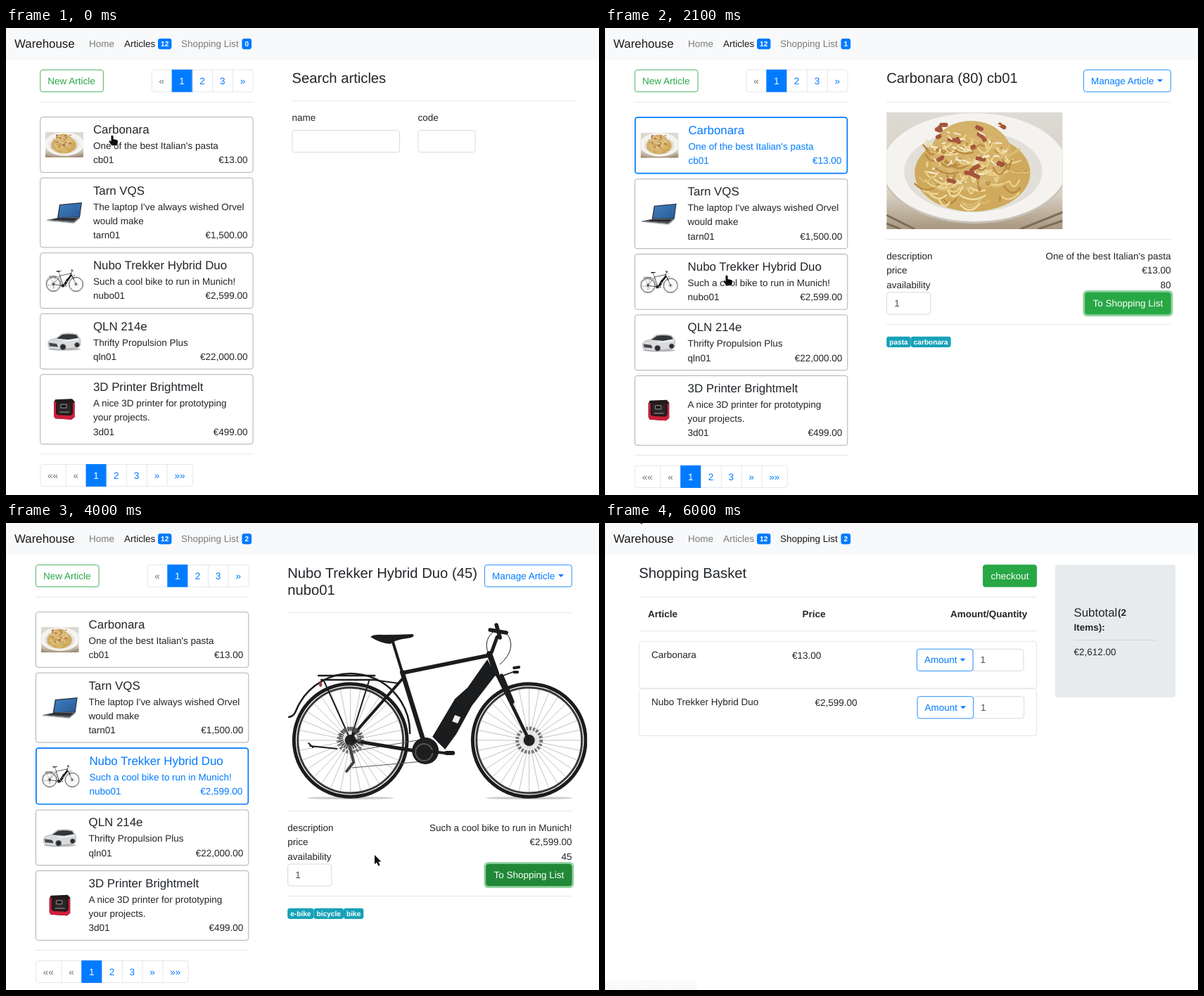
Animation, 843 px wide and 664 px high, one loop 6.1 s. Source, as an HTML page:

```html
<!DOCTYPE html>
<html lang="en">
<head>
<meta charset="utf-8">
<title>Warehouse</title>
<style>
html, body { margin: 0; width: 100%; height: 100%; overflow: hidden; background: #fff; }
svg { display: block; width: 843px; height: 664px; font-family: "Liberation Sans", Arial, sans-serif; text-rendering: geometricPrecision; }
text { white-space: pre; }
</style>
</head>
<body>
<svg viewBox="0 0 843 664">
  <defs>
    <linearGradient id="cloth" x2="0" y2="1"><stop offset="0" stop-color="#dcdad3"/><stop offset=".7" stop-color="#d8d0c3"/><stop offset="1" stop-color="#a8977f"/></linearGradient>
    <linearGradient id="screen" x2="1" y2="1"><stop offset="0" stop-color="#3f7fc0"/><stop offset="1" stop-color="#2a5a96"/></linearGradient>
    <symbol id="pasta" viewBox="0 0 250 166" preserveAspectRatio="none"></symbol>
    <symbol id="bike" viewBox="0 0 426 255"></symbol>
    <symbol id="laptop" viewBox="0 0 54 36">
      <path d="M20 6.5L52 3.5 49 25 17 25.5z" fill="#22262c"/>
      <path d="M21 7.5L51 4.6 48.2 24 18.4 24.6z" fill="url(#screen)"/>
      <path d="M17 25.5L49 25 40.5 32 2 28.5z" fill="#4a4d52"/>
      <path d="M18 26.3L45 26 41 28.8 10 27.7z" fill="#25272b"/>
      <path d="M2 28.5L40.5 32 49 25v1.2L40.5 33.5 2 29.6z" fill="#a2a5a9"/>
    </symbol>
    <symbol id="car" viewBox="0 0 54 36">
      <ellipse cx="27" cy="29" rx="23" ry="2" fill="#bbb"/>
      <path d="M4 19Q6 15 15 14L23 7.5Q35 5 45 8L49.5 15V24L45 27 20 30 7 28.5 4 25z" fill="#d9dbdd" stroke="#8a8c90" stroke-width=".6"/>
      <path d="M16 14L24 8.5Q34 6.5 44 9L47 13 33 15.5z" fill="#33373c"/>
      <path d="M5 20L16 21.5 18 26 6 25z" fill="#45484c"/>
      <path d="M25 18L48 15" stroke="#fff"/>
      <g fill="#292b2e" stroke="#777"><circle cx="25" cy="26" r="4"/><circle cx="45" cy="23" r="3.4"/></g>
    </symbol>
    <symbol id="printer" viewBox="0 0 54 36">
      <path d="M14 4L38 3 41.5 7V29L37 32.5 14 31 12 27V8z" fill="#25191c"/>
      <path d="M12 8l3-1v17l3 2 18 1 3-3V8l2.5 1V29L37 32.5 14 31 12 28z" fill="#cf1f3a"/>
      <path d="M18 9H36V24H18z" fill="#2b2527"/>
      <path d="M22 11H30V16H22zM20 22H34" fill="#161214" stroke="#999"/>
    </symbol>
  </defs>
  <g id="stage"></g>
</svg>
<script>
const $ = id => document.getElementById(id);
const BASE = 13.49, H5 = 16.86, H4 = 20.23, SMALL = 10.12;
const INK = '#212529', BLUE = '#007bff', GREEN = '#28a745', LINE = '#dee2e6';

// y is the middle of the text line
const text = (x, y, s, fill = INK, size = BASE, more = '') =>
  `<text x="${x}" y="${y + size * .347}" font-size="${size}" fill="${fill}" ${more}>${s}</text>`;
const right = (x, y, s, fill) => text(x, y, s, fill, BASE, 'text-anchor="end"');
const mid = (x, y, s, fill) => text(x, y, s, fill, BASE, 'text-anchor="middle"');
const bold = (x, y, s, fill, size) => text(x, y, s, fill, size, 'font-weight="700"');
const box = (x, y, w, h, fill, stroke = 'none', sw = .85, r = 3.4, more = '') =>
  `<rect x="${x + sw / 2}" y="${y + sw / 2}" width="${w - sw}" height="${h - sw}" rx="${r}" fill="${fill}" stroke="${stroke}" stroke-width="${sw}" ${more}/>`;
const rule = (x, y, w, color = '#e5e5e5') => `<path d="M${x} ${y}h${w}" stroke="${color}" stroke-width=".9"/>`;
const button = (x, y, w, s, color) => box(x, y, w, 32, '#fff', color) + text(x + 11, y + 16, s, color);
const solid = (x, y, w, s, color) => box(x, y, w, 32, color, color) + mid(x + w / 2, y + 16, s, '#fff');
const caret = (x, y) => `<path d="M${x} ${y}h8l-4 4z" fill="${BLUE}"/>`;
const input = (x, y, w, s = '') => box(x, y, w, 32, '#fff', '#ced4da') + text(x + 11, y + 16, s, '#495057');
const pill = (x, y, w, s, color) => box(x, y, w, 15.2, color, 'none', 0) + bold(x + 4.05, y + 7.6, s, '#fff', SMALL);
const image = (id, x, y, w, h) => `<use href="#${id}" x="${x}" y="${y}" width="${w}" height="${h}"/>`;

let seed = 7;
const rnd = (a, b) => a + (b - a) * ((seed = seed * 16807 % 2147483647) / 2147483647);
const pick = list => list[Math.floor(rnd(0, list.length))];

function drawPasta() {
  let s = `<path d="M0 0H250V166H0z" fill="url(#cloth)"/><path d="M0 146L40 166M0 158L20 166M190 166L250 142M215 166L250 154" stroke="#7d6c58" stroke-width="3"/>
    <ellipse cx="125" cy="82" rx="131" ry="76" fill="#c9c2b8"/><ellipse cx="125" cy="78" rx="131" ry="77" fill="#f4f3f0"/>
    <ellipse cx="123" cy="84" rx="98" ry="58" fill="#e2dfd8"/><ellipse cx="122" cy="86" rx="82" ry="55" fill="#cfa95c"/>
    <ellipse cx="120" cy="62" rx="58" ry="50" fill="#d4b26a"/>`;
  for (let i = 0; i < 100; i++) {
    const a = rnd(0, 6.28), r = Math.sqrt(rnd(0, 1)), w = rnd(-38, 38);
    s += `<path d="M${120 + 74 * r * Math.cos(a) - w / 2} ${82 + 52 * r * Math.sin(a)}q${w / 2} ${rnd(6, 22)} ${w} ${rnd(-8, 5)}" fill="none" stroke="${pick(['#ecd28a', '#dfbd75', '#b98a40', '#f0dda4'])}" stroke-width="2.4"/>`;
  }
  for (let i = 0; i < 60; i++) {
    const x = 120 + rnd(-58, 52), y = 55 + rnd(-40, 45), meat = i % 3 == 0;
    s += `<path d="M${x} ${y}l${rnd(-9, 9)} ${rnd(-4, 4)}" stroke-linecap="round" stroke="${meat ? '#a4553c' : '#f6ecd2'}" stroke-width="${meat ? 6 : 2}"/>`;
  }
  return s;
}

function drawBike() {
  const wheel = (x, y) => {
    let s = `<ellipse cx="${x}" cy="251" rx="62" ry="2" fill="#ccc"/>`;
    for (let a = 0; a < 6.28; a += 6.283 / 32)
      s += `<path d="M${x} ${y}L${x + 75 * Math.cos(a)} ${y + 75 * Math.sin(a)}" stroke="#999" stroke-width=".6"/>`;
    return s + `<g fill="none"><circle cx="${x}" cy="${y}" r="80.3" stroke="#1c1c1d" stroke-width="5"/><circle cx="${x}" cy="${y}" r="75" stroke="#3a3a3b" stroke-width="3"/>
      <circle cx="${x}" cy="${y}" r="17" stroke="#777" stroke-width="5" stroke-dasharray="3 2"/></g><circle cx="${x}" cy="${y}" r="8" fill="#222"/>`;
  };
  const line = (d, w, c = '#1b1c1e') => `<path d="${d}" fill="none" stroke="${c}" stroke-width="${w}" stroke-linecap="round"/>`;
  return wheel(89.5, 169) + wheel(343.5, 169)
    + line('M2 136q7-1 10-9A84 84 0 0 1 174 159', 2.5)
    + line('M44 77H124M48 83H122', 2.5) + line('M122 83L158 88M52 85L88 165M116 84L92 160', 2)
    + line('M47 88v3', 4, '#944')
    + line('M90 185L190 168M92 208L192 199', 1, '#555')
    + line('M90 165L163 82', 4) + line('M90 169L200 187', 5)
    + line('M32 177L70 181M30 173L36 179', 2) + line('M88 176L94 200 84 213', 4, '#444')
    + '<circle cx="89" cy="166" r="13" fill="none" stroke="#55504c" stroke-width="6" stroke-dasharray="2 1"/>'
    + line('M150 30L163 72', 4) + line('M163 72L194 172', 6.5) + line('M164 73L287 48', 5.5)
    + '<path d="M284 54L256 94 238 110 206 164 224 182 240 160 262 120 296 76z" fill="#1b1c1e"/>'
    + '<path d="M238 133l8 3-4 9-8-3z" fill="#eee"/>'
    + line('M287 46L297 74', 8) + line('M298 76L343 168', 4.5) + line('M304 78L319 114', 7)
    + line('M290 44L298 22', 5) + line('M288 12L311 16M297 5L302 23', 5.5)
    + line('M311 16q17 22-9 45M292 15q-16 14-4 36', 1)
    + line('M304 78L320 72', 1.5) + line('M322 66l7-1M322 72h5', 4)
    + '<path d="M118 22q4-4 18-3 22 0 42-1 5 4-8 6-17 2-24 8-14-1-28-10z" fill="#1b1c1e"/>'
    + '<circle cx="196" cy="184" r="19" fill="#1d1e20"/><circle cx="194" cy="186" r="12" fill="none" stroke="#555" stroke-width="2"/>'
    + line('M196 184L232 188', 4) + line('M226 187h9', 6);
}

$('pasta').innerHTML = drawPasta();
$('bike').innerHTML = drawBike();

const articles = [
  ['Carbonara', ["One of the best Italian's pasta"], 'cb01', '€13.00', 'pasta', 80, [['pasta', 34.5], ['carbonara', 57]]],
  ['Tarn VQS', ["The laptop I've always wished Orvel", 'would make'], 'tarn01', '€1,500.00', 'laptop'],
  ['Nubo Trekker Hybrid Duo', ['Such a cool bike to run in Munich!'], 'nubo01', '€2,599.00', 'bike', 45, [['e-bike', 37.3], ['bicycle', 42.5], ['bike', 28.3]]],
  ['QLN 214e', ['Thrifty Propulsion Plus'], 'qln01', '€22,000.00', 'car'],
  ['3D Printer Brightmelt', ['A nice 3D printer for prototyping', 'your projects.'], '3d01', '€499.00', 'printer'],
];

function navbar(page, count, hover) {
  const tone = a => `rgba(0,0,0,${a})`, cart = page == 'cart';
  return `<path d="M0 0H843V45.5H0z" fill="#f8f9fa"/>` + text(12, 22, 'Warehouse', tone(.9), H5)
    + text(118, 22, 'Home', tone(.5)) + text(168, 22, 'Articles', tone(cart ? .5 : .9))
    + pill(216, 15, 19.4, 12, BLUE) + text(249, 22, 'Shopping List', tone(cart ? .9 : hover ? .7 : .5))
    + pill(335.4, 15, 13.7, count, BLUE);
}

function pager(x, y, items) {
  let cells = '', at = x;
  for (const s of items) {
    const w = s.length > 1 ? 36.5 : 28.8, active = s == '1';
    if (at > x) cells += `<path d="M${at + .4} ${y}v32" stroke="${LINE}" stroke-width=".85"/>`;
    if (active) cells += box(at, y, w + .8, 32, BLUE, BLUE, .85, 0);
    cells += mid(at + w / 2, y + 16, s, active ? '#fff' : s[0] == '«' ? '#6c757d' : BLUE);
    at += w;
  }
  return box(x, y, at - x + .8, 32, '#fff', LINE) + cells;
}

function list(x, chosen, focus) {
  let s = button(x, 59.2, 90.5, 'New Article', GREEN) + pager(x + 158.6, 59.2, ['«', '1', '2', '3', '»']) + rule(x, 105.5, 303);
  let y = 126.2;
  articles.forEach(([title, lines, code, price, icon], i) => {
    const on = i == chosen, d = on ? .85 : 0, h = 59.3 + 20.25 * lines.length + 2 * d, color = on ? BLUE : INK;
    s += box(x, y, 303.2, h, '#fff', on ? BLUE : '#a0a0a0', on ? 1.7 : .85);
    if (on && focus) s += box(x - .6, y - .6, 304.4, h + 1.2, 'none', '#a52fe0', 1.7, 3.4, 'opacity=".65"');
    s += image(icon, x + 7.7 + d, y + h / 2 - 18, 54, 36) + text(x + 75.6 + d, y + 18 + d, title, color, H5);
    lines.forEach((l, n) => s += text(x + 75.6 + d, y + 41.2 + d + 20.25 * n, l, color));
    const base = y + h - 18.2 - d;
    s += text(x + 75.6 + d, base, code, color) + right(x + 295.2 - d, base, price, color);
    y += h + 6.9;
  });
  return s + rule(x, y + 6.8, 303) + pager(x, y + 21.2, ['««', '«', '1', '2', '3', '»', '»»']);
}

function search() {
  const x = 406.5;
  return text(x, 71, 'Search articles', INK, H4) + rule(x, 103.5, 404) + text(x, 127.7, 'name') + text(585.5, 127.7, 'code')
    + input(x, 145, 153.5) + input(585.5, 145, 82);
}

function detail(i, ring, dark) {
  const [title, [about], code, price, icon, stock, tags] = articles[i];
  const x = 400.2, r = 804.5, pasta = !i, y = pasta ? 300.5 : 409.5, green = dark ? '#218838' : GREEN;
  let s = text(x, 71, `${title} (${stock})${pasta ? ' ' + code : ''}`, INK, H4) + (pasta ? '' : text(x, 95.3, code, INK, H4))
    + button(680, 59.2, 124.7, 'Manage Article', BLUE) + caret(785, 73) + rule(x, pasta ? 105.5 : 127.5, 404.3)
    + (pasta ? image(icon, x, 120, 250.4, 166) : image(icon, x, 140, 426, 255)) + rule(x, y, 404.3);
  [['description', about], ['price', price], ['availability', stock]].forEach(([k, v], n) =>
    s += text(x, y + 24 + 20.25 * n, k) + right(r, y + 24 + 20.25 * n, v));
  s += input(x, y + 75, 63, 1) + solid(682, y + 75, 122.7, 'To Shopping List', green);
  if (ring) s += box(679.4, y + 72.4, 127.9, 37.2, 'none', GREEN, 2.7, 4.5, 'opacity=".5"');
  s += rule(x, y + 121, 404.3);
  let at = x;
  for (const [tag, w] of tags) {
    s += pill(at, y + 138.2, w, tag, '#17a2b8');
    at += w;
  }
  return s;
}

function cart() {
  const row = (y, i, price, dx) => box(48.3, y, 565.7, 67.6, '#fff', '#dfdfdf') + text(66, y + 19.2, articles[i][0]) + text(price, y + 20.3, articles[i][3])
    + input(522.5 + dx, y + 11, 73, 1) + button(443 + dx, y + 11, 80.5, 'Amount', BLUE) + caret(504.5 + dx, y + 25);
  return text(48.3, 71, 'Shopping Basket', INK, H4) + solid(537, 59.2, 77, 'checkout', GREEN) + rule(48.3, 105.5, 565.7)
    + bold(61, 129, 'Article') + bold(280.5, 129, 'Price') + bold(491, 129, 'Amount/Quantity') + rule(48.3, 153.5, 565.7)
    + row(167.8, 0, 266, 0) + row(235.3, 2, 298.5, .6)
    + box(640, 59.2, 171, 188.8, '#e7ebee', 'none', 0, 4) + text(666.5, 126.7, 'Subtotal', INK, H5) + bold(729, 127.5, '(2')
    + bold(666.5, 148.5, 'Items):') + rule(666.5, 166.5, 117.5, '#d0d3d5') + text(666.5, 183.3, '€2,612.00');
}

const status = (s, w, alpha) => `<g opacity="${alpha}"><path d="M0 650.5H${w - 3}q3 0 3 3V664H0z" fill="#12141d"/>`
  + text(2, 657.3, s, '#9b9ca0', SMALL, 'font-family="Noto Serif, serif"') + '</g>';

const path = [[0, 151, 153], [600, 151, 153], [1200, 744, 387], [1500, 744, 387], [1800, 207, 334], [2100, 173, 352], [2800, 173, 352],
  [2900, 175, 352], [3400, 744, 497], [3800, 744, 497], [4000, 524, 472], [4500, 283, 18], [5200, 283, 18], [5900, 46, -14], [6100, 46, -14]];

function pointer(t, page, buttonY) {
  const i = path.findIndex(p => p[0] > t), [t0, x0, y0] = path[i - 1], [t1, x1, y1] = path[i];
  const k = (t - t0) / (t1 - t0), e = k * k * (3 - 2 * k), x = x0 + (x1 - x0) * e, y = y0 + (y1 - y0) * e;
  const over = (l, r, top, bottom) => x > l && x < r && y > top && y < bottom;
  const hand = over(118, 349, 8, 36) || page != 'cart' && (over(42, 345, 126, 594) || over(682, 805, buttonY, buttonY + 32));
  const d = hand ? 'M-1.5 .6Q0-1 1.5 .6V5l5.2 1.3Q8.4 7 8 9.2L6.9 14H-.6L-4.6 8.6Q-4.6 6.8-2.8 7.3L-1.5 8.4z' : 'M0 0V13.2L3 10.4 5.2 15.6 7.6 14.5 5.4 9.5H9.4z';
  return `<path transform="translate(${x} ${y})" d="${d}" fill="#0a0a0a" stroke="#fff" stroke-width="1" paint-order="stroke"/>`;
}

function scene(t) {
  const page = t < 500 ? 'search' : t < 4700 ? 'detail' : 'cart', bike = t >= 2900;
  const ring = t >= 1400 && t < 2900 || t >= 3600;
  const dark = t >= 1200 && t < 1700 || t >= 3400 && t < 4100;
  let s = navbar(page, t < 1400 ? 0 : t < 3700 ? 1 : 2, t >= 4500);
  if (page == 'search') s += list(48.3, -1) + search();
  else if (page == 'detail') s += list(42, bike ? 2 : 0, !ring) + detail(bike ? 2 : 0, ring, dark);
  else s += cart();
  if (t >= 600 && t < 1000) s += status('Connecting…', 284, t < 900 ? 1 : .4);
  if (t >= 4500 && t < 5500) s += status('localhost:4200/cart', 101, 1);
  if (t >= 5500) s += status('localhost:4200/articles', 131, t < 5900 ? 1 : t < 6000 ? .4 : .02);
  return s + pointer(t, page, bike ? 484.5 : 375.5);
}

let shown = -1;
function tick(now) {
  const t = Math.floor(now % 6100 / 100) * 100;
  if (t != shown) $('stage').innerHTML = scene(shown = t);
  requestAnimationFrame(tick);
}
tick(0);
</script>
</body>
</html>
```
